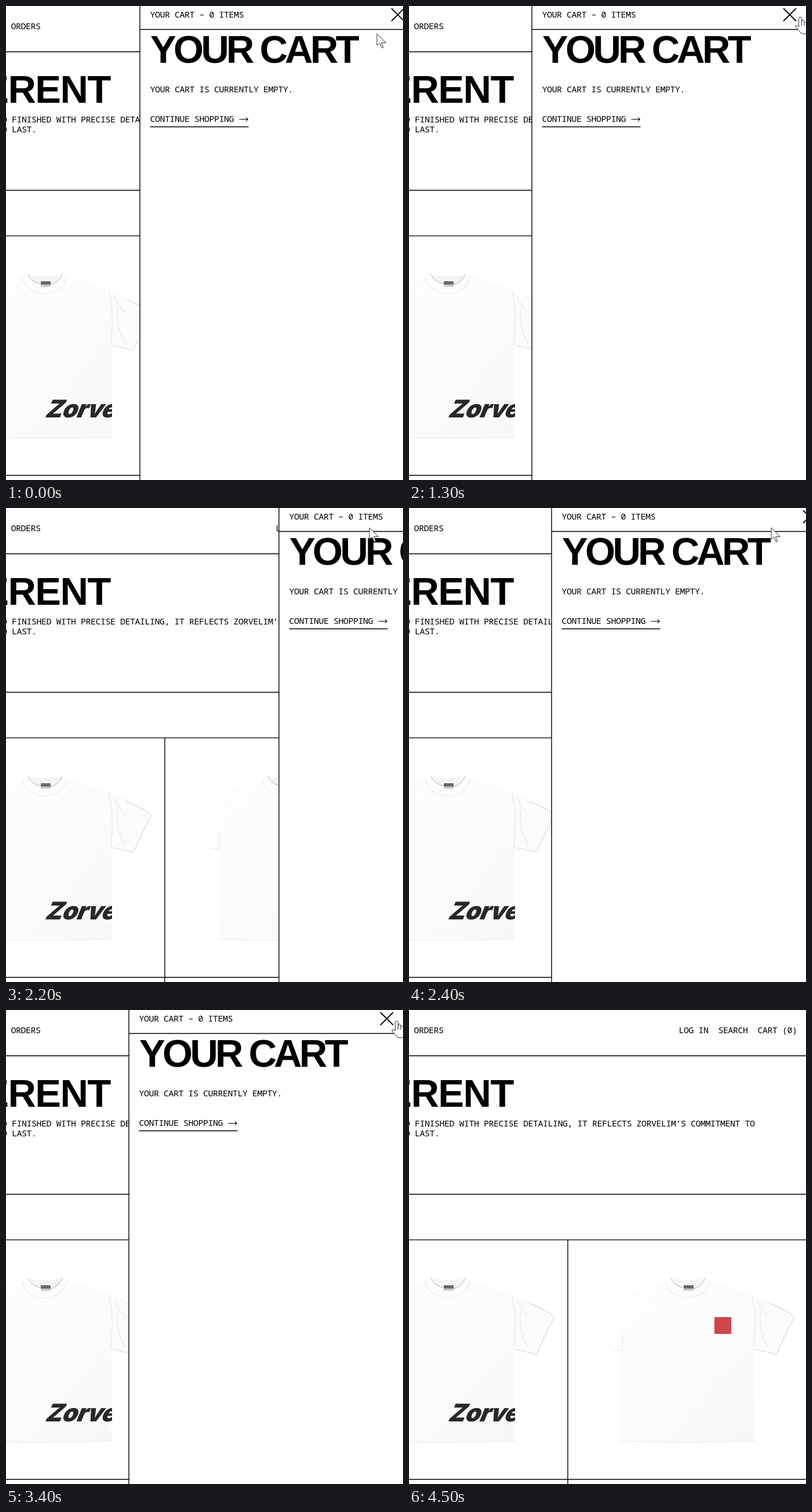
These frames come from a looping animation (685 by 818 pixels, 4600 ms). An HTML page:

```html
<!DOCTYPE html>
<html lang="en">
<head>
<meta charset="utf-8">
<title>Cart drawer</title>
<style>
  html, body { margin: 0; width: 100%; height: 100%; overflow: hidden; background: #fff; }
  svg { display: block; width: 685px; height: 818px; }
  text { font: 15px "Noto Sans Mono", monospace; letter-spacing: -.5px; white-space: pre; }
  .big { font: bold 67px "Liberation Sans", Arial, sans-serif; letter-spacing: -4.7px; }
  .hero { letter-spacing: -1.5px; text-anchor: end; }
  .print { font: 900 42px Inter, sans-serif; letter-spacing: -1px; fill: #282828; }
  .rule { fill: none; stroke: #000; stroke-width: 1.4; }
  .cursor { fill: #fff; stroke: #333; stroke-width: 1; stroke-linejoin: round; }
  .fold { fill: none; stroke: #e8e8e8; stroke-width: 1.2; stroke-linecap: round; }
</style>
</head>
<body>
<svg viewBox="0 0 685 818">
  <defs>
    <linearGradient id="cloth" x1="0" y1="0" x2="1" y2="1">
      <stop offset="0" stop-color="#fdfdfd"/>
      <stop offset=".6" stop-color="#fafbfa"/>
      <stop offset="1" stop-color="#f7f7f7"/>
    </linearGradient>
    <clipPath id="chest"><rect y="660" width="183" height="70"/></clipPath>
    <!-- Shirt, with x = 0 at the middle of the collar -->
    <g id="shirt">
      <path fill="#fefefe" d="M-105 492Q-128 508-161 584L-113 590V520Z"/>
      <path fill="#fbfbfb" d="M108 490Q145 500 185 528Q170 556 153 594L114 586Z"/>
      <path fill="url(#cloth)" d="M-30 466Q-70 480-105 492Q-116 505-113 590L-115 744Q0 747 115 744V560L112 492Q75 475 33 466Q0 500-30 466Z"/>
      <path fill="#f4f4f4" d="M-27 464Q0 468 29 464Q22 481 2 482Q-18 481-27 464Z"/>
      <path class="fold" d="M-39 468Q-34 494 1 497Q33 494 38 467M-113 560V588L-128 587M110 492Q120 520 114 586M120 500Q128 522 141 530M126 520Q120 548 138 582M-115 744Q0 747 115 744"/>
      <path class="fold" style="stroke:#d8d8d8" d="M141 506Q166 517 180 526M184 530Q170 556 154 592M118 586Q136 590 153 594"/>
      <path class="fold" style="stroke:#9a9a9a;stroke-width:.8" d="M-29 463Q-25 475-9 479M10 481Q25 477 30 463"/>
      <path fill="#6a6a6a" d="M-7 475h17v6h-17z"/>
      <path fill="#b5b5b5" d="M-7 482h17v2h-17z"/>
    </g>
  </defs>

  <text x="8.5" y="40">ORDERS</text>
  <text x="465.5" y="40">LOG IN  SEARCH  CART (0)</text>
  <text class="big hero" x="179.8" y="167">ERENT</text>
  <text x="-15.5" y="201"> D FINISHED WITH PRECISE DETAILING, IT REFLECTS ZORVELIM’S COMMITMENT TO</text>
  <text x="-15.5" y="218"> D LAST.</text>
  <use href="#shirt" x="67"/>
  <use href="#shirt" x="481"/>
  <g clip-path="url(#chest)">
    <text class="print" transform="translate(66 709.5) skewX(-22)">Zorvelim</text>
  </g>
  <rect x="527" y="530" width="29" height="29" fill="#cf454c"/>
  <path class="rule" d="M0 79H685M0 318H685M0 396.6H685M0 810H685M274 396V818"/>

  <g id="panel">
    <rect width="500" height="818" fill="#fff"/>
    <path class="rule" d="M0 0V818M0 40.5H500M17.5 208.5H187.5"/>
    <text x="17.5" y="20">YOUR CART – 0 ITEMS</text>
    <path fill="none" stroke="#000" stroke-width="1.8" d="M434 4L456 26M456 4L434 26"/>
    <text class="big" x="18" y="98">YOUR CART</text>
    <text x="17.5" y="149">YOUR CART IS CURRENTLY EMPTY.</text>
    <text x="17.5" y="200">CONTINUE SHOPPING</text>
    <path fill="none" stroke="#000" stroke-width="1.1" d="M171.5 195.5H186M183 192.300L186.300 195.500L183 198.700"/>
  </g>

  <path id="arrow" class="cursor" d="M0 0V20L4.5 16L8.5 24.5L11 23.3L7.5 15.5H15.5Z"/>
  <path id="hand" class="cursor" d="M-2.5 17V2.5a2.5 2.5 0 0 1 5 0V9Q5-.5 7 9.5Q9.5 7.5 11.5 10.5Q15 10 15 13.5V20Q15 28 8 29H5Q0 28-2 24L-8 17Q-8.5 14-5.5 14.5ZM2.5 9V15M7 9.5V15M11.5 10.5V15"/>
</svg>
<script>
const LOOP = 4600, STEP = 100, OPEN_X = 212, WIDTH = 476;
const [panel, arrow, hand] = ["panel", "arrow", "hand"].map(id => document.getElementById(id));

// time, x, y, pointer over a link
const path = [
  [0, 640, 48, 0], [900, 640, 48, 0], [1200, 668, 25, 1], [1300, 675, 19, 1],
  [1500, 668, 18, 1], [1700, 650, 30, 1], [2000, 633, 34, 1], [2200, 627, 34, 0],
  [2400, 625, 34, 0], [2800, 627, 34, 0], [3100, 658, 24, 1], [3300, 674, 19, 1],
  [3600, 674, 19, 1], [3900, 705, 10, 1], [LOOP, 705, 10, 1]
];

// share of a slide still to go, easing out
const left = (t, start, time) => (1 - Math.min(1, Math.max(0, (t - start) / time))) ** 3;

function shift(t) {
  if (t < 1000) return 19;
  if (t < 1500) return WIDTH * left(t, 571, 500);
  if (t < 2100) return WIDTH * (1 - left(t, 1500, 200));
  if (t < 3400) return WIDTH * left(t, 2108, 500);
  return WIDTH * (1 - left(t, 3474, 200));
}

function draw() {
  const t = Math.floor(performance.now() % LOOP / STEP) * STEP;
  panel.setAttribute("transform", `translate(${Math.round(OPEN_X + shift(t))})`);

  const i = path.findIndex(k => k[0] > t);
  const [t0, x0, y0, link] = path[i - 1], [t1, x1, y1] = path[i];
  const p = (t - t0) / (t1 - t0);
  const place = `translate(${x0 + (x1 - x0) * p} ${y0 + (y1 - y0) * p})`;
  for (const el of [arrow, hand]) el.setAttribute("transform", place);
  arrow.style.display = link ? "none" : "";
  hand.style.display = link ? "" : "none";
  requestAnimationFrame(draw);
}
draw();
</script>
</body>
</html>
```
